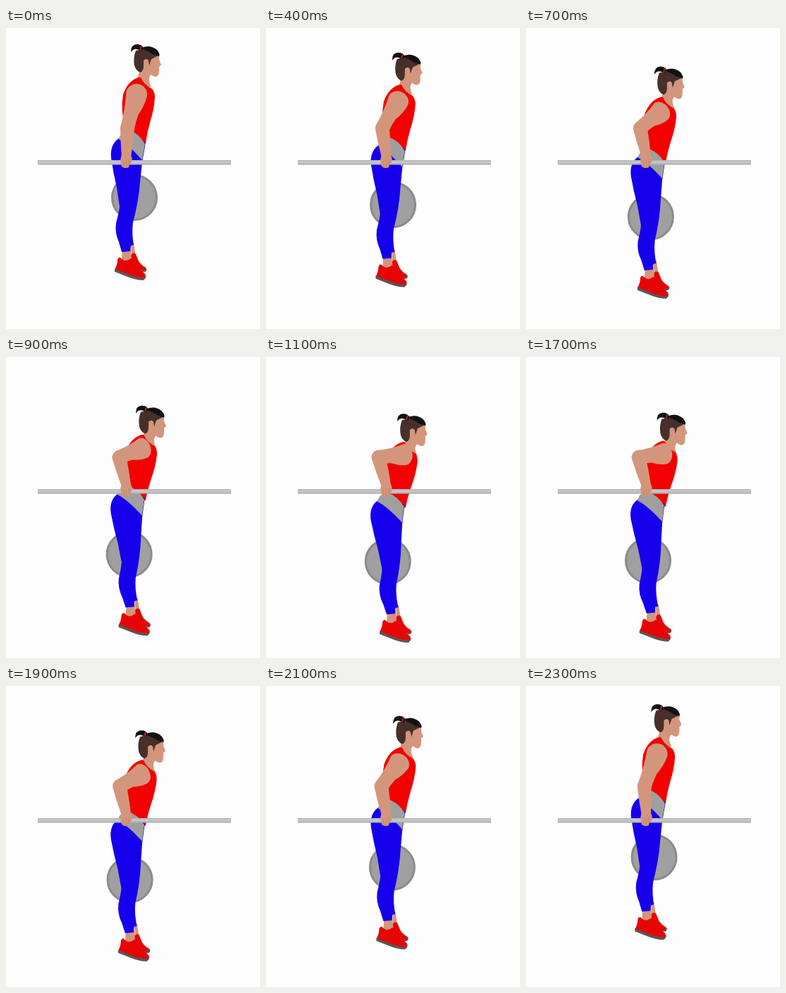
Recreate the animation shown at these times as an HTML page without scripts. Size 360 px wide and 426 px high, loop 2.4 s.

```html
<!DOCTYPE html>
<html lang="en">
<head>
<meta charset="utf-8">
<title>Bar dip</title>
<style>
html, body { margin: 0; width: 100%; height: 100%; overflow: hidden; background: #fdfdfd; }

@property --t { syntax: "<number>"; inherits: true; initial-value: 0; }
@keyframes tick { to { --t: 24; } }

svg {
  display: block; width: 360px; height: 426px;
  animation: tick 2400ms steps(24) infinite;

  /* depth of the dip, 0 to 1: a cosine that hurries near the end of the rise */
  --turn: calc(var(--t) * 12.6deg + pow(var(--t) / 24, 5) * 57.6deg);
  --p: calc((1 - cos(var(--turn))) / 2);

  /* arm joints */
  --shx: calc(185 + var(--p) * 13);
  --shy: calc(94 + var(--p) * 50);
  --elx: calc(172 - 13 * pow(var(--p), .35));
  --ely: 142;
  --wrx: 170.5;
  --wry: 182;
}

.head { transform: translate(calc(var(--p) * 10px), calc(var(--p) * 65px)); }
.torso {
  transform-origin: 0 160px;
  transform: translateY(calc(var(--p) * 57px)) skewX(calc(var(--p) * -4deg));
}
.legs {
  transform-origin: 0 190px;
  transform: translateY(calc(var(--p) * 53.5px)) skewX(calc(var(--p) * 3.6deg));
}
.shoes { transform: translate(calc(var(--p) * 8px), calc(var(--p) * 53.5px)); }
.plate { transform: translate(calc(var(--p) * -10.5px), calc(var(--p) * 56px)); }

/* a bone runs down from its joint (x, y) to the next one (x2, y2) */
.bone {
  --dx: calc(var(--x) - var(--x2));
  --dy: calc(var(--y2) - var(--y));
  transform:
    translate(calc(var(--x) * 1px), calc(var(--y) * 1px))
    rotate(atan2(var(--dx), var(--dy)))
    scale(1, calc(hypot(var(--dx), var(--dy)) / var(--len)));
}
.upper { --x: var(--shx); --y: var(--shy); --x2: var(--elx); --y2: var(--ely); --len: 50; }
.fore { --x: var(--elx); --y: var(--ely); --x2: var(--wrx); --y2: var(--wry); --len: 40; }

.skin { fill: #d3967c; }
.red { fill: #f30000; }
.blue { fill: #1600ec; }
.grey { fill: #9f9f9f; }
.shoe { fill: #e60405; }
.sole { fill: #5a5658; }
.black { fill: #141112; }
.brown { fill: #463029; }
</style>
</head>
<body>
<svg viewBox="0 0 360 426">
  <defs>
    <linearGradient id="steel" x2="0" y2="1">
      <stop offset="0" stop-color="#b2b2b2"/>
      <stop offset=".45" stop-color="#cacaca"/>
      <stop offset="1" stop-color="#a9a9a9"/>
    </linearGradient>
  </defs>

  <circle class="plate" cx="182" cy="240" r="31.500" fill="#a0a0a0" stroke="#8b8b8b" stroke-width="3"/>

  <g class="shoes">
    <path class="skin" d="M177 304H181L184 324H178Z"/>
    <path class="shoe" d="M176 323Q180 316 184 320L188 330Q192 336 198 339Q201 343 197 345L184 343L176 335Z"/>
    <path class="sole" d="M186 341Q193 344 199 342L197 345Q190 346 185 343Z"/>
    <path class="skin" d="M165 312H177L178 328Q171 334 164 328Z"/>
    <path class="shoe" d="M154 342Q158 335 158 328Q160 322 164 327Q170 332 177 326L181 331Q184 339 195 346Q200 350 197 355L185 354Z"/>
    <path class="sole" d="M154 341L172 348Q185 354 198 353L195 357Q184 357 172 352L154 345Z"/>
  </g>

  <g class="head">
    <path class="skin" d="M197 34L217 37V45L220 52L217 55V61Q217 69 211 69L205 66Q200 72 206 83L186 86L184 73Q189 68 189 57Z"/>
    <path class="brown" d="M184 32Q180 42 182 53Q184 60 190 63Q195 61 195 54V46Q199 42 202 46L203 53L206 44L216 39L200 29Z"/>
    <path class="black" d="M190 29Q203 22 214 31Q219 37 217 40L208 37Q200 31 190 29Z"/>
    <path class="black" d="M177 34Q177 23 186 23Q193 23 195 29L191 33Q183 26 177 34Z"/>
    <path fill="none" stroke="#a3262b" stroke-width="2" d="M192 25L190 32"/>
  </g>

  <path class="torso red" d="M188 70L191 70Q195 80 207 86Q211 91 211 98Q210 115 204 134Q200 148 198 163L176 160L169 142Q162 116 166 94Q173 74 188 70Z"/>

  <g class="legs">
    <path class="blue" d="M160 156Q147 165 149 184Q152 205 157 226L161 253Q160 262 156 276Q154 290 160 303L164 317L176 316L177 308L181 307Q178 290 180 275Q188 245 190 218L193 190L198 162L185 156Z"/>
    <path class="grey" d="M164 149L175 145Q188 149 197 164L193 187Q173 164 159 157Z"/>
  </g>

  <rect x="45" y="187" width="274" height="6.600" fill="url(#steel)"/>

  <g class="skin">
    <path class="bone upper" d="M-15 0A15 15 0 0 1 15 0Q15 13 10 27Q9 38 10 50A10 10 0 0 1 -10 50Q-10 25 -15 0Z"/>
    <path class="bone fore" d="M-10 0A10 10 0 0 1 10 0Q9 20 6.500 42H-6.500Q-9 20 -10 0Z"/>
    <path d="M164 179H176Q180 184 178 191L175 193L174 197Q169 200 164 196L162 187Z"/>
  </g>
  <path fill="none" stroke="#b97f68" stroke-width=".7" d="M166 188L167 197M170 187L171 198M174 186V194"/>
</svg>
</body>
</html>
```
